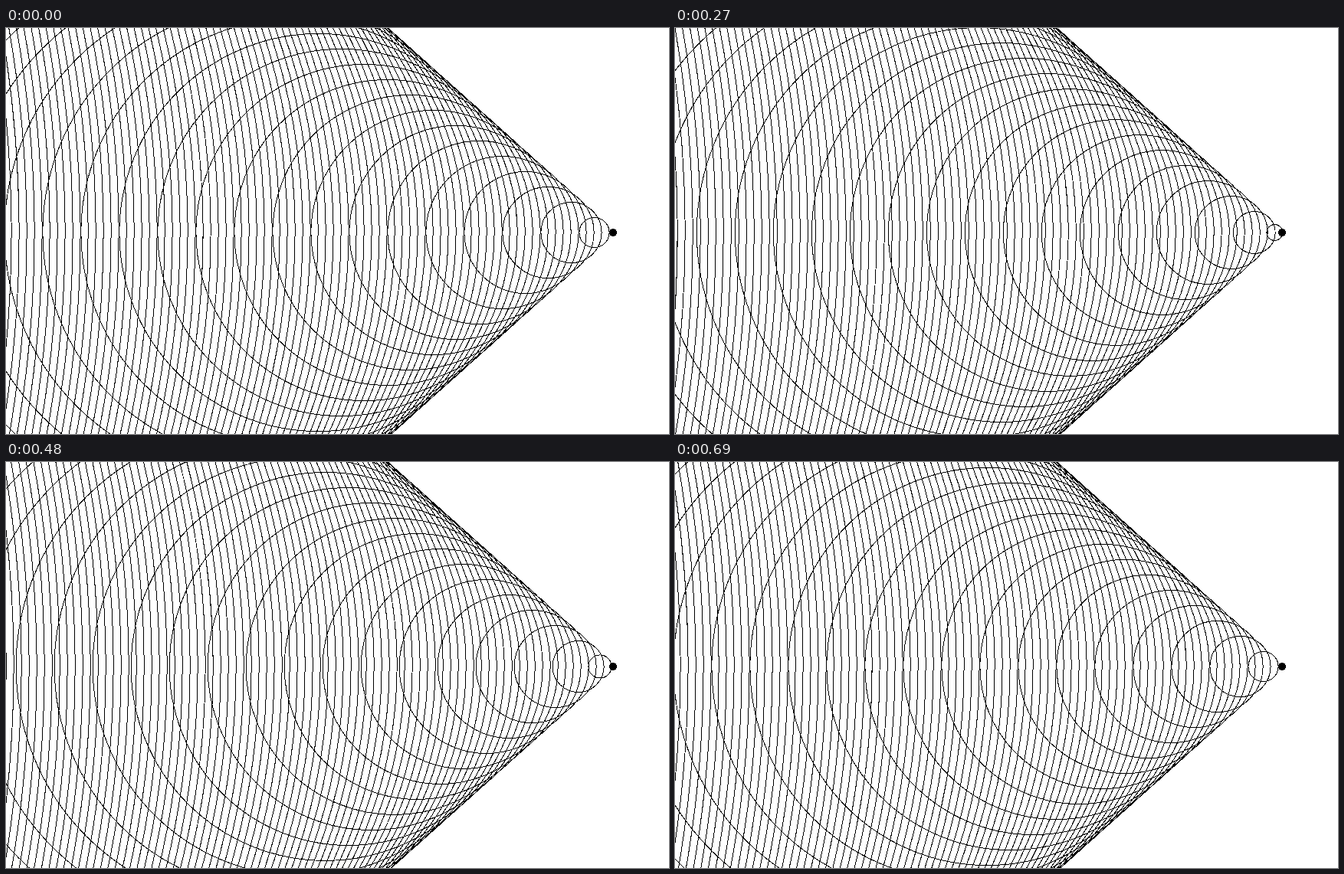
Write an HTML page that moves like this. It is 865 px wide and 530 px high and loops after 0.72 s.

```html
<!DOCTYPE html>
<html lang="en">
<head>
<meta charset="utf-8">
<title>Wave fronts behind a fast source</title>
<style>
  html, body { margin: 0; width: 100%; height: 100%; overflow: hidden; background: #fff; }
  svg { display: block; width: 865px; height: 530px; }
  circle { shape-rendering: crispEdges; }
  .wave { fill: none; stroke: #000; stroke-width: 1; }
</style>
</head>
<body>
<svg id="stage" viewBox="0 0 865 530"></svg>
<script>
const LOOP = 720, TICK = 30, STEPS = LOOP / TICK - 1;
const MACH = 1.5, GAP = 20, WAVES = 82;
const APEX = 797.5, AXIS = 267;
const INSET = 0.4; // the line runs just inside each wave's edge
const DOT = { x: 792, r: 5 };

const stage = document.getElementById('stage');

function addCircle(name) {
  const c = document.createElementNS('http://www.w3.org/2000/svg', 'circle');
  c.setAttribute('class', name);
  c.setAttribute('cy', AXIS);
  stage.appendChild(c);
  return c;
}

function place(c, x, r) {
  c.setAttribute('cx', x);
  c.setAttribute('r', r);
}

const waves = Array.from({ length: WAVES }, () => addCircle('wave'));
place(addCircle('dot'), DOT.x, DOT.r);

const mix = (a, b, p) => a + (b - a) * p;

function draw(time) {
  const p = Math.floor((time % LOOP) / TICK + 1e-6) / STEPS;
  waves.forEach((wave, i) => {
    if (i === 0) {
      // The newest wave grows out of the dot itself.
      place(wave, mix(DOT.x, APEX - MACH * GAP, p), mix(DOT.r, GAP, p) - INSET);
    } else {
      const r = GAP * (i + p);
      place(wave, APEX - MACH * r, r - INSET);
    }
  });
}

function loop() {
  draw(performance.now());
  requestAnimationFrame(loop);
}

draw(0);
requestAnimationFrame(loop);
</script>
</body>
</html>
```
